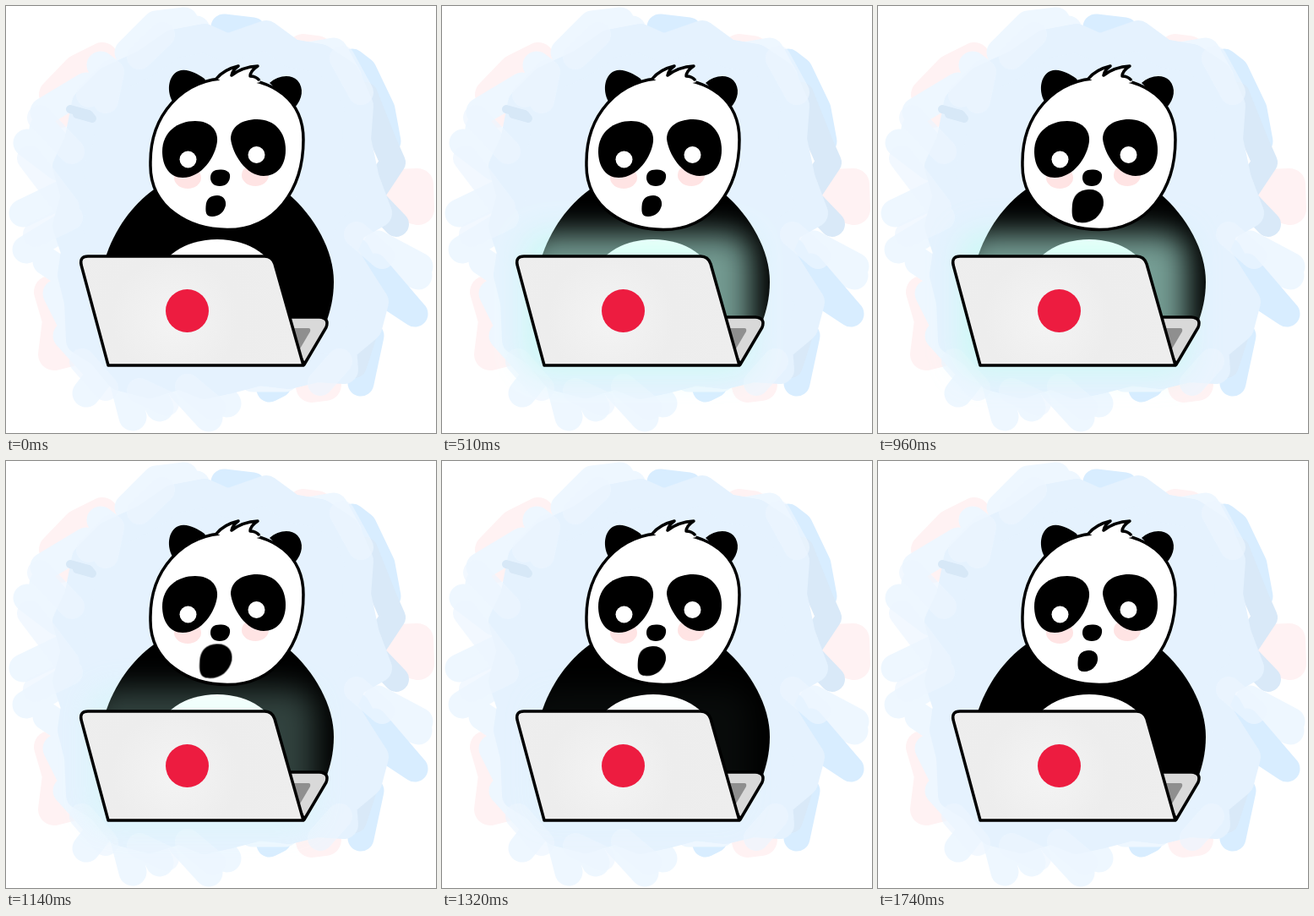
An HTML page for the animation above (1.8 s loop, 509 px wide and 505 px high).

```html
<!DOCTYPE html>
<html lang="en">
<head>
<meta charset="utf-8">
<title>Surprised panda</title>
<style>
  html, body { margin: 0; width: 100%; height: 100%; overflow: hidden; background: #fff; }
  svg { display: block; width: 509px; height: 505px; }
  .brush path { fill: none; stroke-linecap: round; stroke-linejoin: round; }
  .ink { stroke: #000; stroke-width: 3.5; stroke-linejoin: round; }
  #glow { opacity: 0; }
  #mouth { transform-box: fill-box; transform-origin: 50% 49%; }
</style>
</head>
<body>
<svg viewBox="0 0 509 505">
  <defs>
    <radialGradient id="metal" gradientUnits="userSpaceOnUse" cx="200" cy="370" r="150">
      <stop offset="0" stop-color="#f4f4f4"/>
      <stop offset=".5" stop-color="#ededed"/>
      <stop offset="1" stop-color="#eeeeee"/>
    </radialGradient>
    <filter id="soft" filterUnits="userSpaceOnUse" x="0" y="150" width="509" height="355">
      <feGaussianBlur stdDeviation="18"/>
    </filter>
  </defs>

  <g class="brush">
    <g stroke="#fff2f3" stroke-width="38">
      <path d="M58 105L86 76L114 62M65 125L80 95"/>
      <path d="M462 212L487 211L488 240L455 232"/>
      <path d="M52 338L62 372L57 412L85 405"/>
      <path d="M352 52L368 54M378 448L362 450"/>
    </g>
    <g stroke="#d8edff" stroke-width="31">
      <path d="M258 25L292 29M410 66L423 76L445 122L452 160"/>
      <path d="M432 390L420 446M312 453L322 448"/>
    </g>
    <g stroke="#d9e9f8" stroke-width="30">
      <path d="M425 105L447 160L458 185L438 215M440 235L462 258"/>
      <path d="M430 370L412 425"/>
    </g>
    <g stroke="#eef7ff" stroke-width="33">
      <path d="M145 55L178 22L211 18M225 28L205 45M112 70L145 95M45 125L95 95"/>
      <path d="M25 162L62 190M44 145L70 175M20 245L68 222M24 288L70 260M48 302L75 320"/>
      <path d="M60 340L90 400M72 390L110 432M95 458L125 420M150 486L138 440M182 475L165 440"/>
      <path d="M240 487L208 452M262 470L240 440M292 440L330 440M352 60L388 54L405 85"/>
      <path d="M440 282L489 308M440 300L488 319"/>
    </g>
    <path stroke="#d8edff" stroke-width="31" d="M415 290L440 335L484 364M436 308L484 364"/>
    <path stroke="#e5f2fe" stroke-width="34" style="fill:#e5f2fe"
      d="M95 115L122 88L165 68L198 45L235 38L262 50L308 34L338 56L372 62L402 82L418 118L415 158L425 205L440 245L410 262L398 290L418 322L436 350L428 380L398 405L400 430L368 428L335 436L300 432L262 442L235 448L205 436L170 447L135 438L112 410L88 395L86 350L78 318L82 290L72 260L82 225L72 190L86 160Z"/>
    <g stroke="#edf6ff" stroke-width="30" opacity=".7">
      <path d="M98 105L125 78L118 112M158 60L185 34M40 132L78 172M28 180L72 238M35 270L76 250"/>
      <path d="M90 420L118 452M158 455L190 470M215 450L245 475M398 62L420 102"/>
      <path d="M415 270L445 296M395 420L372 446"/>
    </g>
    <path stroke="#d7e8f7" stroke-width="10" d="M76 122L98 128L102 133L84 128"/>
  </g>

  <path d="M117 300C128 264 150 235 175 217L333 221C366 249 388 290 388 326C388 345 384 361 378 377L345 424L125 424Z"/>
  <ellipse cx="250" cy="326" rx="71" ry="50" fill="#fff"/>

  <g id="glow">
    <rect x="98" y="269" width="268" height="164" rx="24" fill="#befff0" fill-opacity=".62" filter="url(#soft)"/>
  </g>

  <path d="M199 116C189 102 192 82 204 77C214 73 226 80 235 86L238 92ZM312 91C322 82 337 80 345 88C353 97 351 110 342 120Z"/>
  <path class="ink" fill="#fff" d="M171 187C170 130 208 85.500 264 85.500C318 85.500 352 112 352 158C352 218 318 264.500 262 264.500C218 264.500 170 239 171 187Z"/>
  <path fill="#fff" d="M250 86Q258 75 275 71Q268 76 267 82Q280 72 298 71Q289 77 289 83Q296 83 301 90L270 97Z"/>
  <path class="ink" fill="none" d="M249 86Q258 75 275 71Q268 76 267 82Q280 72 298 71Q289 77 289 83Q296 83 300 88"/>

  <g fill="#ffe4e4">
    <ellipse cx="215" cy="203" rx="16" ry="13"/>
    <ellipse cx="295" cy="200" rx="16" ry="13"/>
  </g>
  <path d="M185 172C185 149 203 136 224 136C242 136 251 147 250 160C248 178 232 203 209 203C194 203 185 190 185 172Z"/>
  <path d="M266 157C266 143 279 134 297 134C318 134 331 149 331 170C331 190 320 201 305 201C284 201 268 175 266 157Z"/>
  <g fill="#fff">
    <circle cx="215.500" cy="181.500" r="10"/>
    <circle cx="296.500" cy="176" r="10"/>
  </g>
  <path d="M242 203C242 196 247 193 255 193.500C262 194 266 197 265 203C264 209 260 213 253 213C246 213 242 209 242 203Z"/>
  <path id="mouth" d="M236.500 237C237 227 243 224 250 224C257 224 261 229 260 236C258 244 252 249 244 249C237 249 236 245 236.500 237Z"/>

  <path class="ink" fill="#d9d9d9" d="M325 368H371Q383 369 379 380L353 424Z"/>
  <path fill="#8f8f8f" d="M338 381H358Q361 381 360 385L347 407Z"/>
  <path class="ink" fill="url(#metal)" d="M89 306Q87 296 97 296H306Q315 296 318 305L352 425H121Z"/>
  <circle cx="214.500" cy="360.500" r="25.500" fill="#ed1c40"/>
</svg>
<script>
  const LOOP = 1800;

  // Each row: time in ms, value, easing towards the next row.
  function loop(id, prop, rows) {
    const frames = rows.map(([ms, value, easing = 'linear']) =>
      ({ offset: ms / LOOP, [prop]: value, easing }));
    document.getElementById(id).animate(frames, { duration: LOOP, iterations: Infinity });
  }

  loop('glow', 'opacity', [
    [0, 0], [70, 0, 'ease'], [610, 1], [960, 1, 'ease'], [1500, 0], [LOOP, 0]
  ]);

  loop('mouth', 'transform', [
    [0, 'scale(1)'], [600, 'scale(1)', 'ease'], [1140, 'scale(1.62)'],
    [1200, 'scale(1.62)', 'ease'], [1740, 'scale(1)'], [LOOP, 'scale(1)']
  ]);
</script>
</body>
</html>
```
